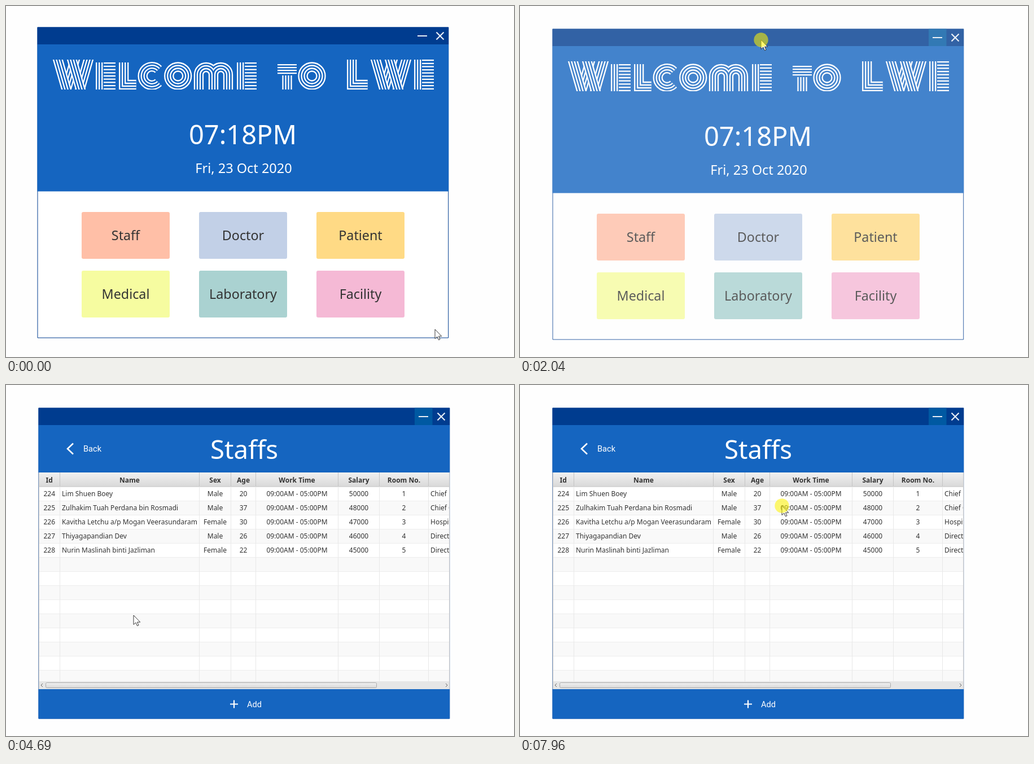
Write an HTML page that moves like this. It is 900 px wide and 622 px high and loops after 8000 ms.

```html
<!DOCTYPE html>
<html lang="en">
<head>
<meta charset="utf-8">
<style>
html, body { margin: 0; width: 100%; height: 100%; overflow: hidden; background: #fefefe; }
svg { display: block; width: 100%; height: 100%; }
text { font-family: "Noto Sans", "Open Sans", sans-serif; }
.mid { text-anchor: middle; }
.ui { font: 14.6px Roboto, sans-serif; fill: #fff; }
.cell { font-size: 12px; fill: #333; }
.head { font-weight: bold; }
</style>
</head>
<body>
<svg viewBox="0 0 900 622">
  <defs>
    <clipPath id="band"><path d="M0 95H900V148H0z"/></clipPath>
    <clipPath id="frame"><path d="M0 0H727.5V551H0z"/></clipPath>
    <linearGradient id="shade" x2="0" y2="1"><stop stop-color="#f1f1f1"/><stop offset="1" stop-color="#d9d9d9"/></linearGradient>
  </defs>
  <g id="win">
    <path d="M0 1H727.7V551H0z" fill="#fff" stroke="#003c8f"/>
    <g id="home"></g>
    <g id="staff"></g>
    <path d="M-.5 .5H728.2V31H-.5z" fill="#003c8f"/>
    <path id="min" d="M666 .5H697.5V31H666z" fill="#005ba4"/>
    <path d="M673 16H690M706.5 9.5l13 13m0-13l-13 13" stroke="#e8eef6" stroke-width="2.2"/>
  </g>
  <g id="pointer">
    <path id="arrow" d="M0 0V16.5L3.9 13L6.5 18.8L9 17.7L6.5 12.2H11.7z" fill="#fff" stroke="#222" stroke-width=".9"/>
    <path id="hand" d="M0 1.5Q1.5-1 3 1.5V8Q5 6 6 8Q8 6.5 9 8.5Q12 7.5 12 10.5V15L10 20H1.5L-4 13Q-5.5 10-3 10.5L0 13z" fill="#fff" stroke="#222"/>
    <circle id="spot" r="12.7" fill="#fff500" fill-opacity=".56"/>
  </g>
</svg>
<script>
const $ = id => document.getElementById(id);
const blue = '#1565c0';
const text = (x, y, s, cls = '', size = '', fill = '') =>
  `<text x="${x}" y="${y}" class="${cls}" ${size && `font-size="${size}"`} ${fill && `fill="${fill}"`}>${s}</text>`;
const rect = (x, y, w, h, fill, more = '') =>
  `<rect x="${x}" y="${y}" width="${w}" height="${h}" fill="${fill}" ${more}/>`;
const bar = (y, h) => rect(-.5, y, 728.7, h, blue);

// Four parallel lines made from nested strokes
const stripes = d => [17.3, 12.7, 7.3, 2.7].map((w, i) =>
  `<path d="${d}" fill="none" stroke="${i % 2 ? blue : '#fff'}" stroke-width="${w}"/>`).join('');
const ring = x => stripes(`M${x - 16} 124a16 16 0 1 1 32 0a16 16 0 1 1-32 0`);
const letterL = (x, top, foot) => stripes(`M${x + 8.7} ${top}V139.5h${foot}`);
const letterW = x => `<g transform="translate(${x})">` +
  ['M41 85L20 158', 'M65 85L44 158', 'M5 85L26 158', 'M30 85L51 158'].map(stripes).join('') + '</g>';
function letterE(x, top) {
  const rows = Math.floor((148 - top) / 5.3), pitch = (145.6 - top) / (rows - 1);
  let d = '';
  for (let i = 0; i < 3; i++) d += `M${x + 1.2 + i * 5} ${top}V148`;
  for (let i = 0; i < rows; i++) d += `M${x + 14} ${146.8 - i * pitch}h21`;
  return `<path d="${d}" stroke="#fff" stroke-width="2.3"/>`;
}
const title = '<g role="img" aria-label="Welcome to LWE" transform="translate(-56 -37)" clip-path="url(#band)">' +
  letterW(84) + letterE(159, 100) + letterL(200, 100, 22) +
  stripes('M270 112.5A16.3 16.3 0 1 0 270 135.5') + ring(304.7) +
  stripes('M341.5 148V121.5a13 13 0 0 1 26 0V148M367.5 148V121.5a13 13 0 0 1 26 0V148') +
  letterE(409, 100) + stripes('M481 111.7H515') + stripes('M498 123V148') + ring(542) +
  letterL(604, 95, 28) + letterW(647) + letterE(723, 95) + '</g>';

const buttons = [['Staff', '#ffbfa7'], ['Doctor', '#c2d0e7'], ['Patient', '#ffda85'],
  ['Medical', '#f6fca0'], ['Laboratory', '#aad2d1'], ['Facility', '#f5b9d5']]
  .map(([label, fill], i) => ({ label, fill, x: 78 + i % 3 * 208, y: 328 + (i > 2 ? 104 : 0) }));

$('home').innerHTML = bar(31, 260.5) + title +
  text(363.5, 208, '07:18PM', 'mid', 47, '#fff') +
  text(365, 259, 'Fri, 23 Oct 2020', 'mid', 23.5, '#fff') +
  buttons.map(b => rect(b.x, b.y, 156, 83, b.fill, 'rx="3" class="btn"') +
    text(b.x + 78, b.y + 50, b.label, 'mid', 23.3, '#333')).join('');

let edge = 0;
const columns = [['Id', 37.5], ['Name', 247], ['Sex', 56], ['Age', 44],
  ['Work Time', 146], ['Salary', 73], ['Room No.', 87]]
  .map(([label, w]) => ({ label, mid: edge + w / 2, end: edge += w }));
const people = [
  ['Lim Shuen Boey', 'Male', 20, 'Chief Executive'],
  ['Zulhakim Tuah Perdana bin Rosmadi', 'Male', 37, 'Chief Compliance'],
  ['Kavitha Letchu a/p Mogan Veerasundaram', 'Female', 30, 'Hospital Manager'],
  ['Thiyagapandian Dev', 'Male', 26, 'Director'],
  ['Nurin Maslinah binti Jazliman', 'Female', 22, 'Director']];

let table = rect(0, 115, 728, 25, 'url(#shade)');
for (let i = 0; i < 14; i++) {
  const y = 140 + i * 25;
  table += rect(0, y, 728, Math.min(25, 485 - y), i % 2 ? '#f9f9f9' : '#fff') +
    `<path d="M0 ${y + .5}H728" stroke="#ededed"/>`;
}
table += '<path d="M0 140H728" stroke="#c8c8c8"/>' +
  columns.map(c => `<path d="M${c.end} 115V140" stroke="#c4c4c4"/><path d="M${c.end} 140V485" stroke="#e8e8e8"/>` +
    text(c.mid, 133, c.label, 'cell head mid')).join('') +
  people.map(([name, sex, age, job], i) => {
    const y = 157 + i * 25;
    const cells = [224 + i, , sex, age, '09:00AM - 05:00PM', i ? 49000 - i * 1000 : 50000, i + 1];
    return cells.map((s, c) => text(columns[c].mid, y, s, 'cell mid')).join('') +
      text(41, y, name, 'cell') + text(694, y, job, 'cell');
  }).join('');

$('staff').innerHTML = bar(31, 84) + rect(-.5, 31, 155.5, 84, '#5e92f3', 'id="back"') +
  '<path d="M61 63.5L51 73L61 82.5" fill="none" stroke="#fff" stroke-width="2.6"/>' +
  text(79, 78, 'Back', 'ui') + text(364, 91, 'Staffs', 'mid', 45.5, '#fff') +
  `<g clip-path="url(#frame)">${table}</g>` +
  rect(0, 485, 728, 14, '#e6e6e6') +
  rect(12.5, 487.5, 586, 9, 'url(#shade)', 'rx="2" stroke="#aaa"') +
  '<path d="M7 489l-3 3l3 3M721 489l3 3l-3 3" fill="none" stroke="#666"/>' +
  '<path d="M.5 115V499M727.5 115V499" stroke="#c8c8c8"/>' + bar(499, 52.5) +
  '<path d="M339 525.5h14m-7-7v14" stroke="#fff" stroke-width="2.2"/>' +
  text(369, 531, 'Add', 'ui');

const stepTime = 204, lead = 15;
const grab = 4, lift = 6, drop = 11;
const windowPath = [[5, 56, 37], [6, 64, 35], [7, 96, 50], [8, 71, 65], [9, 51, 45], [10, 58, 40]];
const pointerPath = [[0, 760, 573], [grab, 425, 57], [drop, 427, 60], [14, 625, 400], [16, 235, 412],
  [19, 336, 380], [21, 226, 408], [23, 226, 408], [28, 157, 133], [30, 157, 133],
  [33, 172, 247], [35, 215, 404], [36, 215, 404], [39, 464, 214]];
const clicks = [21, 30, 36, 39];

function along(keys, n) {
  const i = keys.findIndex(k => k[0] > n);
  if (i < 1) return keys.at(i).slice(1);
  const [n0, x0, y0] = keys[i - 1], [n1, x1, y1] = keys[i];
  const u = (n - n0) / (n1 - n0), e = u * u * (3 - 2 * u);
  return [x0 + (x1 - x0) * e, y0 + (y1 - y0) * e];
}
const show = (el, on) => el.style.display = on ? '' : 'none';
const move = (el, x, y) => el.setAttribute('transform', `translate(${x} ${y})`);
const inside = (x, y, l, t, w, h) => x >= l && x < l + w && y >= t && y < t + h;
const tiles = document.querySelectorAll('.btn');

function draw() {
  const n = Math.floor((performance.now() % 8000 + lead) / stepTime);
  const [wx, wy] = along(windowPath, n);
  const held = n >= grab && n < drop, dragging = held && n >= lift;
  const [x, y] = held ? [wx + 369, wy + 20] : along(pointerPath, n);
  const px = x - wx, py = y - wy;
  // Every click switches the page one step later
  const onStaff = clicks.filter(c => c < n).length % 2 === 1;
  const overBack = onStaff && inside(px, py, 0, 31, 155, 84);
  let over = overBack;

  move($('win'), wx, wy);
  $('win').setAttribute('opacity', dragging ? .8 : 1);
  $('min').setAttribute('opacity', Math.min(.95, Math.max(0, (n - 5) * .4)));
  show($('home'), !onStaff);
  show($('staff'), onStaff);
  show($('back'), overBack);
  buttons.forEach((b, i) => {
    const hot = !onStaff && inside(px, py, b.x, b.y, 156, 83);
    tiles[i].setAttribute('opacity', hot ? .85 : 1);
    over ||= hot;
  });
  move($('pointer'), x, y);
  show($('hand'), over);
  show($('arrow'), !over);
  show($('spot'), dragging || clicks.includes(n));
  requestAnimationFrame(draw);
}
draw();
</script>
</body>
</html>
```
